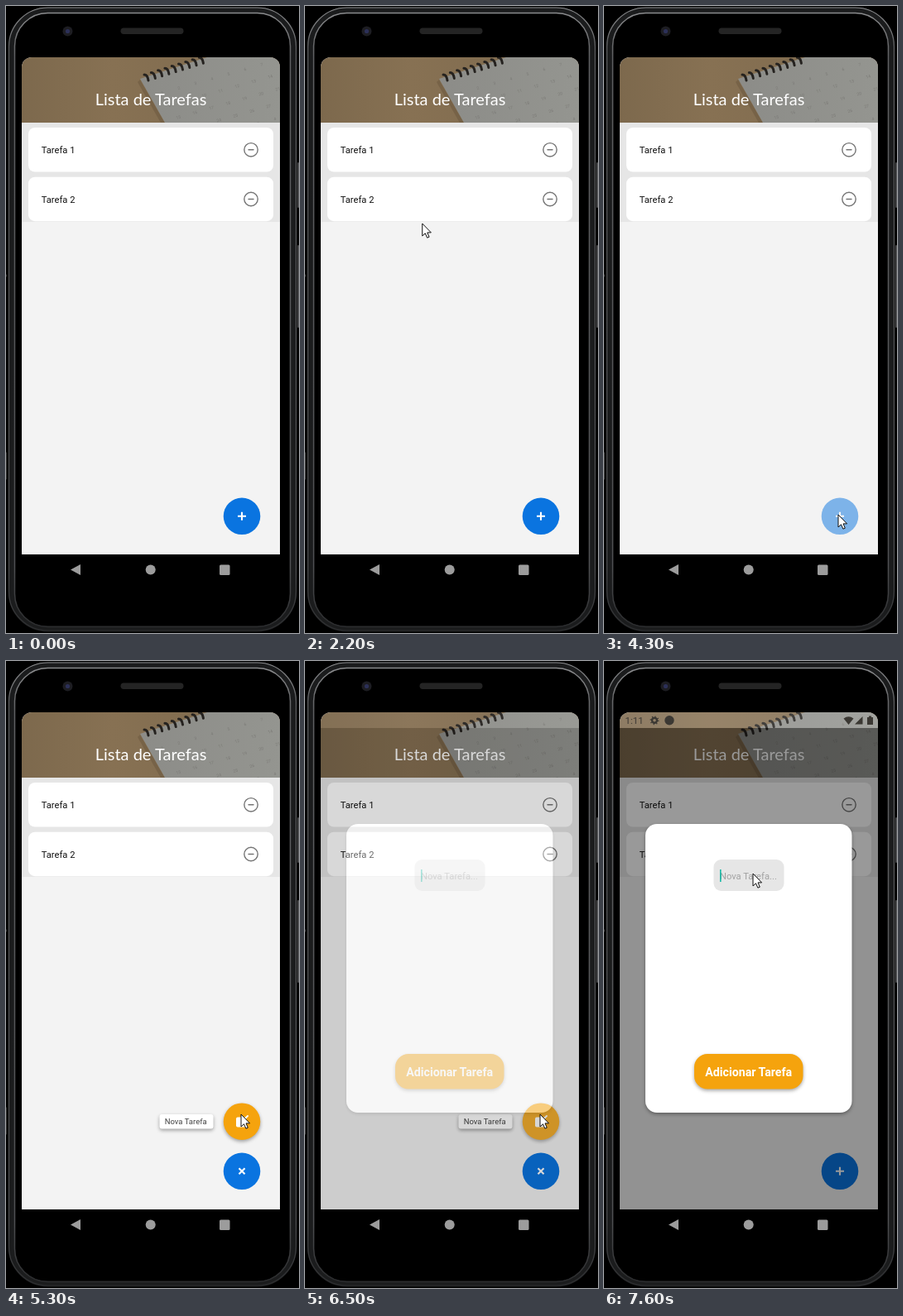
Recreate the animation shown at these times as an HTML page. Size 354 px wide and 758 px high, loop 8 s.

```html
<!DOCTYPE html>
<html lang="pt">
<head>
<meta charset="utf-8">
<title>Lista de Tarefas</title>
<style>
  html, body { margin: 0; height: 100%; overflow: hidden; background: #000; }
  svg { display: block; width: 100vw; height: 100vh; }
  text { font-family: Roboto, sans-serif; }
  .title { font: 20px Lato, sans-serif; fill: #fff; text-anchor: middle; }
  .task { font-size: 11.2px; fill: #111; }
  .hint { font-size: 11.2px; fill: #a2a2a2; }
  .tag { font-size: 9.5px; fill: #444; }
  .add { font-size: 14.2px; font-weight: 700; fill: #fff; text-anchor: middle; }
  .clock { font-size: 11.5px; fill: #3b3833; }
  .date { font-size: 5px; fill: #7b7a76; }
  .line { fill: none; stroke-linecap: round; stroke-linejoin: round; }
  .lift { filter: drop-shadow(0 2px 2px rgba(0, 0, 0, .35)); }
</style>
</head>
<body>
<svg viewBox="0 0 354 758">
  <defs>
    <clipPath id="screen"><path d="M19 663V74a12 12 0 0 1 12-12H319a12 12 0 0 1 12 12V663Z"/></clipPath>
    <clipPath id="head"><rect x="19" y="62" width="312" height="79"/></clipPath>
    <linearGradient id="desk">
      <stop offset="0" stop-color="#7d694d"/>
      <stop offset=".35" stop-color="#877153"/>
      <stop offset="1" stop-color="#7d694d"/>
    </linearGradient>
    <linearGradient id="page">
      <stop offset="0" stop-color="#8c8c88"/>
      <stop offset="1" stop-color="#949590"/>
    </linearGradient>
    <linearGradient id="metal" x2="0" y2="1">
      <stop offset="0" stop-color="#8a8b8d"/>
      <stop offset=".07" stop-color="#606163"/>
      <stop offset=".9" stop-color="#505153"/>
      <stop offset="1" stop-color="#2b2c2e"/>
    </linearGradient>
    <g id="row">
      <rect x="27" y="147" width="296" height="53.5" rx="8" fill="#fff"/>
      <g class="line" stroke="#757575" stroke-width="1.4">
        <circle cx="296" cy="173.8" r="8.2"/><path d="M293 173.8h6"/>
      </g>
    </g>
  </defs>

  <!-- phone body -->
  <rect width="354" height="758"/>
  <g class="line">
    <rect x="6.500" y="5" width="341" height="748" rx="44" stroke="#1b1c1d" stroke-width="7"/>
    <rect x="3.500" y="2" width="347" height="753" rx="47" stroke="url(#metal)" stroke-width="1.200"/>
    <rect x="10.500" y="8.500" width="333" height="742" rx="40" stroke="url(#metal)" stroke-width="1.500"/>
    <path d="M353 190v53M353 290v98" stroke="#4a4b4d" stroke-width="2"/>
    <path d="M.5 325v2M.5 540v32" stroke="#333"/>
  </g>
  <circle cx="74.500" cy="30.500" r="6" fill="#1d1d22"/>
  <circle cx="74.500" cy="30.500" r="2.600" fill="#2c3058"/>
  <rect x="138.500" y="26.500" width="76" height="7.500" rx="3.700" fill="#242424"/>
  <g fill="#9c9c9c">
    <path d="M78 681.500L90 675V688Z"/>
    <circle cx="174.700" cy="681.500" r="6"/>
    <rect x="258" y="675.500" width="12.500" height="12.500" rx="1.500"/>
  </g>

  <g clip-path="url(#screen)">
    <rect x="19" y="62" width="312" height="601" fill="#f3f3f3"/>
    <g clip-path="url(#head)">
      <rect x="19" y="62" width="312" height="79" fill="url(#desk)"/>
      <path d="M162 89L193 143H188L159 92Z" fill="#5d4c35" opacity=".35"/>
      <path d="M162 88L243 62H331V141H192Z" fill="url(#page)"/>
      <g id="dates"></g>
      <g id="rings" class="line" stroke="#25221f" stroke-width="3"></g>
    </g>
    <text class="title" x="175" y="120">Lista de Tarefas</text>

    <rect x="19" y="141" width="312" height="120" fill="#e6e6e6"/>
    <use href="#row"/><use href="#row" y="59.700"/>
    <text class="task" x="42.700" y="178">Tarefa 1</text>
    <text class="task" x="42.700" y="237.700">Tarefa 2</text>

    <g id="action">
      <g class="lift">
        <rect x="185.500" y="548" width="65" height="17.500" rx="3" fill="#fff"/>
      </g>
      <text class="tag" x="191.700" y="560.300">Nova Tarefa</text>
      <g id="orange">
        <circle class="lift" cx="285" cy="556.700" r="22.300" fill="#f5a30d"/>
        <rect x="278" y="551.500" width="12" height="12" rx="2" fill="#fff"/>
        <path class="line" d="M285 557l7-7" stroke="#fff" stroke-width="2"/>
      </g>
    </g>
    <g id="fab">
      <circle cx="285" cy="616.800" r="22.300" fill="#0a74e0"/>
      <path id="plus" d="M280 616.800h10M285 611.800v10" stroke="#fff" stroke-width="2.100"/>
    </g>

    <g id="modal">
      <rect x="19" y="62" width="312" height="19" fill="#fff" opacity=".13"/>
      <rect x="19" y="81" width="312" height="582" opacity=".4"/>
      <rect class="lift" x="50" y="197" width="249.500" height="349" rx="14" fill="#fff"/>
      <rect x="132.500" y="240" width="85" height="38" rx="9" fill="#e6e6e6"/>
      <text class="hint" x="140" y="264">Nova Tarefa...</text>
      <rect id="caret" x="140" y="252" width="1.600" height="15" fill="#19b9a6"/>
      <rect class="lift" x="109" y="475" width="131.500" height="42.500" rx="16" fill="#f5a30d"/>
      <text class="add" x="174.700" y="502">Adicionar Tarefa</text>
    </g>

    <g id="status" fill="#3b3833">
      <text class="clock" x="25.500" y="76">1:11</text>
      <g class="line" stroke="#3b3833">
        <circle cx="61" cy="71.800" r="3" stroke-width="2.400"/>
        <circle cx="61" cy="71.800" r="4.700" stroke-width="1.500" stroke-dasharray="1.200 2.490" stroke-linecap="butt"/>
      </g>
      <circle cx="79" cy="71.800" r="5.700"/>
      <path d="M289.500 69.500Q295.500 65 301.500 69.500L295.500 77Z"/>
      <path d="M303 76.500L312.500 67V76.500Z"/>
      <path d="M318 68h2v-1.500h3V68h2v9h-7Z"/>
    </g>
  </g>

  <path id="cursor" d="M0 0V15L3.500 11.800L5.900 17.200L8.300 16.200L6 10.900H10.600Z" fill="#fff" stroke="#111" stroke-width="1" stroke-linejoin="round"/>
</svg>

<script>
const LOOP = 8000, STEP = 100;
const el = id => document.getElementById(id);

// Each key is [time, value...]
const tracks = {
  cursor: [[1500, 60, 64], [1900, 108, 170], [2300, 153, 294], [2400, 153, 294],
    [2500, 172, 312], [2700, 233, 362], [2900, 268, 433], [3000, 287, 478],
    [3100, 290, 520], [3200, 289, 548], [3300, 276, 585], [3500, 275, 592],
    [3600, 275, 592], [3900, 283, 615], [4800, 283, 615], [5300, 284, 548],
    [6600, 284, 548], [7000, 232, 384], [7300, 194, 274], [7600, 180, 257]],
  fab: [[4000, 1], [4300, .5], [4400, .5], [4700, 1]],
  open: [[4500, 0], [4900, 1], [6500, 1], [6800, 0]],
  orange: [[5900, 1], [6200, .5], [6400, .5], [6500, .85], [6600, 1]],
  modal: [[6400, 0], [6500, .38], [6600, .75], [6700, 1]]
};

function at(track, t) {
  const i = track.findIndex(key => key[0] > t);
  if (i === 0) return track[0].slice(1);
  if (i < 0) return track[track.length - 1].slice(1);
  const a = track[i - 1], b = track[i];
  const k = (t - a[0]) / (b[0] - a[0]);
  return a.slice(1).map((v, n) => v + (b[n + 1] - v) * k);
}

function drawCalendar() {
  let dates = '', rings = '';
  for (let r = 0; r < 5; r++) {
    for (let c = 0; c < 7; c++) {
      const x = 188 + c * 20 + r * 9, y = 107 - c * 5.7 + r * 15;
      dates += `<text class="date" transform="translate(${x} ${y}) rotate(-16)">${(r * 7 + c) % 30 + 1}</text>`;
    }
  }
  for (let i = 0; i < 9; i++) {
    rings += `<path d="M${167 + i * 8.3} ${83 - i * 2.6}q4 0 5 7"/>`;
  }
  el('dates').innerHTML = dates;
  el('rings').innerHTML = rings;
}

function draw(t) {
  const [x, y] = at(tracks.cursor, t);
  const [open] = at(tracks.open, t);
  const [modal] = at(tracks.modal, t);
  el('cursor').setAttribute('transform', `translate(${x} ${y})`);
  el('cursor').setAttribute('opacity', t < 1500 ? 0 : 1);
  el('fab').setAttribute('opacity', at(tracks.fab, t)[0]);
  el('plus').setAttribute('transform', `rotate(${45 * open} 285 616.800)`);
  el('action').setAttribute('opacity', open);
  el('action').setAttribute('transform', `translate(0 ${20 * (1 - open)})`);
  el('orange').setAttribute('opacity', at(tracks.orange, t)[0]);
  el('modal').setAttribute('opacity', modal);
  el('caret').setAttribute('opacity', t >= 7000 && t < 7500 ? 0 : 1);
  el('status').setAttribute('opacity', t >= 6600 ? 1 : 0);
}

drawCalendar();
const start = performance.now();
function tick() {
  const t = (performance.now() - start) % LOOP;
  draw(Math.floor(t / STEP) * STEP);
  requestAnimationFrame(tick);
}
tick();
</script>
</body>
</html>
```
